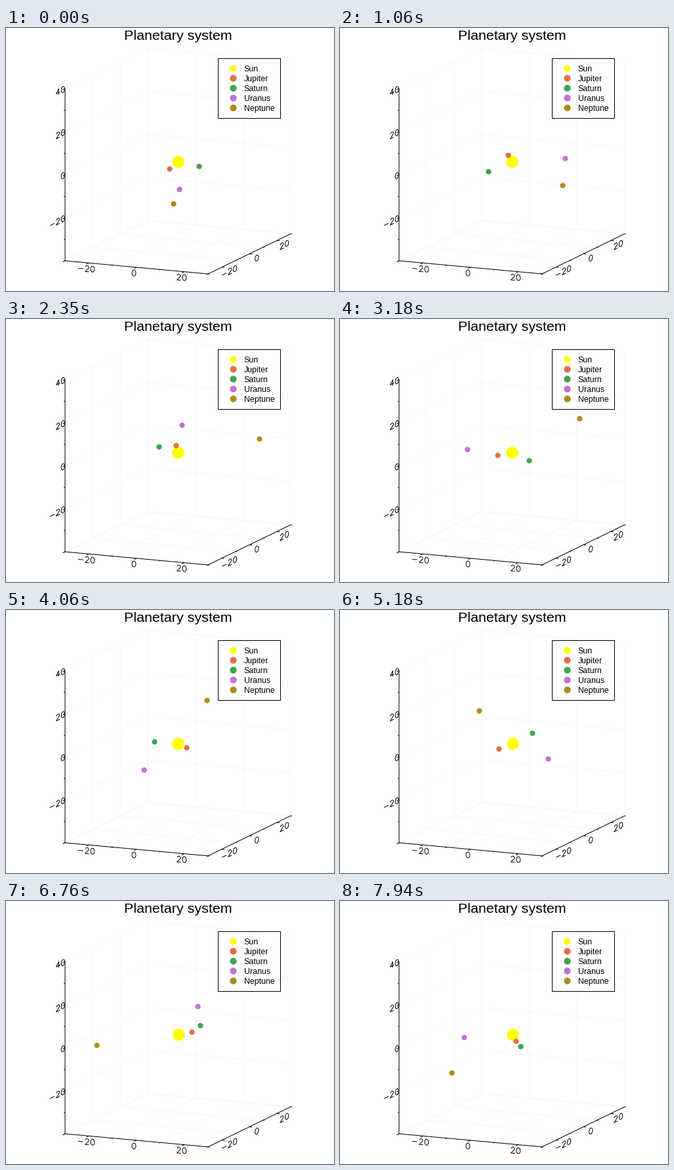
Recreate the animation shown at these times as a matplotlib script. Size 500 px wide and 400 px high, loop 8000 ms.

```python
import numpy as np
import matplotlib.pyplot as plt
from matplotlib.animation import FuncAnimation
from matplotlib.collections import LineCollection
from matplotlib.patches import Rectangle

W, H, DPI = 500, 400, 100
LOOP, TICK, FPS = 8000, 20, 17
STATES = LOOP * FPS // 1000
STEP, SUBSTEPS = 200000 / 513, 16      # days per state, integration steps per state

# Newtonian start values: mass (suns), position (au), velocity (au / 1000 days)
G = 2.959122e-4
BODIES = [
    ("Sun", "#ffff00", 1.000006, (0, 0, 0), (0, 0, 0)),
    ("Jupiter", "#e26f46", 9.548e-4, (-3.50237, -3.81698, -1.5508), (5.65429, -4.1249, -1.90589)),
    ("Saturn", "#3da44d", 2.856e-4, (9.07553, -3.04583, -1.64837), (1.68318, 4.83525, 1.92462)),
    ("Uranus", "#c271d2", 4.37e-5, (8.31014, -16.29011, -7.25213), (3.54178, 1.37102, 0.55029)),
    ("Neptune", "#ac8d18", 5.18e-5, (11.47077, -25.72948, -10.81695), (2.8893, 1.14527, 0.39677)),
]
MASS = np.array([b[2] for b in BODIES])

# Lower front corner of the box and its three edges on screen
CORNER = np.array([90, 354])
EDGES = np.array([[218, 20], [126, -61], [0, -262]])
HALF = np.array([30, 30, 40])


def pt(px):
    return px * 72 / DPI


def project(p):
    return CORNER + (np.asarray(p) / HALF + 1) / 2 @ EDGES


def accel(pos):
    d = pos[None] - pos[:, None]
    r2 = (d ** 2).sum(axis=2)
    np.fill_diagonal(r2, 1)
    return G * (MASS[None, :, None] * d / r2[..., None] ** 1.5).sum(axis=1)


def simulate():
    """Leapfrog integration of all bodies, one stored state per step."""
    pos = np.array([b[3] for b in BODIES], float)
    vel = np.array([b[4] for b in BODIES]) / 1000
    h, acc, path = STEP / SUBSTEPS, accel(pos), []
    for _ in range(STATES):
        for _ in range(SUBSTEPS):
            vel = vel + acc * h / 2
            pos = pos + vel * h
            acc = accel(pos)
            vel = vel + acc * h / 2
        path.append(pos)
    return np.array(path)


def arc(cx, cy, rx, ry, start, end):
    a = np.radians(np.linspace(start, end, 25))
    return np.column_stack([cx + rx * np.cos(a), cy + ry * np.sin(a)])


# Stroke font, 21 units high: advance width and lines
GLYPHS = {
    "-": (26, [[(4, 9), (22, 9)]]),
    "0": (20, [arc(10, 10.5, 7, 10.5, 0, 360)]),
    "2": (20, [np.vstack([arc(10, 15.3, 6, 5.7, 170, -35), [(3, 0), (17, 0)]])]),
    "4": (20, [[(13, 0), (13, 21), (3, 7), (18, 7)]]),
}
UP = np.array([0, -0.43])
ALONG_X = 0.42 * EDGES[0] / EDGES[0][0]
ALONG_Y = 0.38 * EDGES[1] / EDGES[1][0]


def label(text, at, along, right=False):
    """Lines of a text lying along a box edge, centred or ending at a point."""
    total = sum(GLYPHS[c][0] for c in text)
    pen, lines = (3 - total if right else -total / 2), []
    for c in text:
        advance, parts = GLYPHS[c]
        for part in parts:
            lines.append([at + (pen + u) * along + (v - 10.5) * UP for u, v in part])
        pen += advance
    return lines


def grid_lines():
    lines = []
    for v in range(-30, 31, 20):
        lines.append(project([(v, -30, -40), (v, 30, -40), (v, 30, 40)]))
        lines.append(project([(30, v, -40), (-30, v, -40), (-30, v, 40)]))
    for v in range(-40, 41, 20):
        lines.append(project([(-30, -30, v), (-30, 30, v), (30, 30, v)]))
    return lines


def axis_lines():
    lines = [project([(-30, -30, 40), (-30, -30, -40), (30, -30, -40), (30, 30, -40)])]
    out_x, out_y = EDGES[0] / np.hypot(*EDGES[0]), -EDGES[1] / np.hypot(*EDGES[1])

    def tick(p, out, v):
        lines.append([p, p + out * (2 if v % 20 else 4)])

    for v in range(-30, 31, 10):
        px, py = project((v, -30, -40)), project((30, v, -40))
        tick(px, out_y, v)
        tick(py, out_x, v)
        if v % 20 == 0:
            lines.extend(label(str(v), px + [-4, 8.6], ALONG_X))
            lines.extend(label(str(v), py + [11.3, 6.4], ALONG_Y))
    for v in range(-40, 41, 10):
        p = project((-30, -30, v))
        tick(p, out_y, v)
        if v % 20 == 0 and v > -40:
            lines.extend(label(str(v), p + [-0.5, 0.4], ALONG_Y, right=True))
    return lines


def dot(x, y, size, color, z):
    return ax.plot(x, y, "o", ms=pt(size), color=color, mew=0, zorder=z)[0]


def write(x, y, text, px, **style):
    ax.text(x, y, text, family="Liberation Sans", size=pt(px), zorder=6,
            va="baseline", **style)


fig = plt.figure(figsize=(W / DPI, H / DPI), dpi=DPI, facecolor="white")
ax = fig.add_axes([0, 0, 1, 1])
ax.set_xlim(0, W)
ax.set_ylim(H, 0)
ax.axis("off")

ax.add_collection(LineCollection(grid_lines(), colors="#f8f8f8", lw=pt(1), zorder=1),
                  autolim=False)
ax.add_collection(LineCollection(axis_lines(), colors="black", lw=pt(1), zorder=2),
                  autolim=False)
write(262.5, 18, "Planetary system", 21.5, ha="center")

ax.add_patch(Rectangle((322.5, 45.5), 95, 91, fc="white", ec="black", lw=pt(1), zorder=5))
for i, (name, color, *_) in enumerate(BODIES):
    row = 61.2 + 15.05 * i
    dot([345.5], [row], 10.2, color, 6)
    write(362.6, row + 4.4, name, 12.4)

tracks = project(simulate())
dots = [dot([], [], 8.2 if i else 18.4, body[1], 3 + i / 10)
        for i, body in enumerate(BODIES)]


def update(frame):
    # the picture moves on FPS times a second, on a 10 ms clock
    state = (frame * TICK + 15) * FPS // 1000
    for d, (x, y) in zip(dots, tracks[state]):
        d.set_data([x], [y])
    return dots


anim = FuncAnimation(fig, update, frames=LOOP // TICK, interval=TICK,
                     repeat=True, repeat_delay=0)
plt.show()
```
